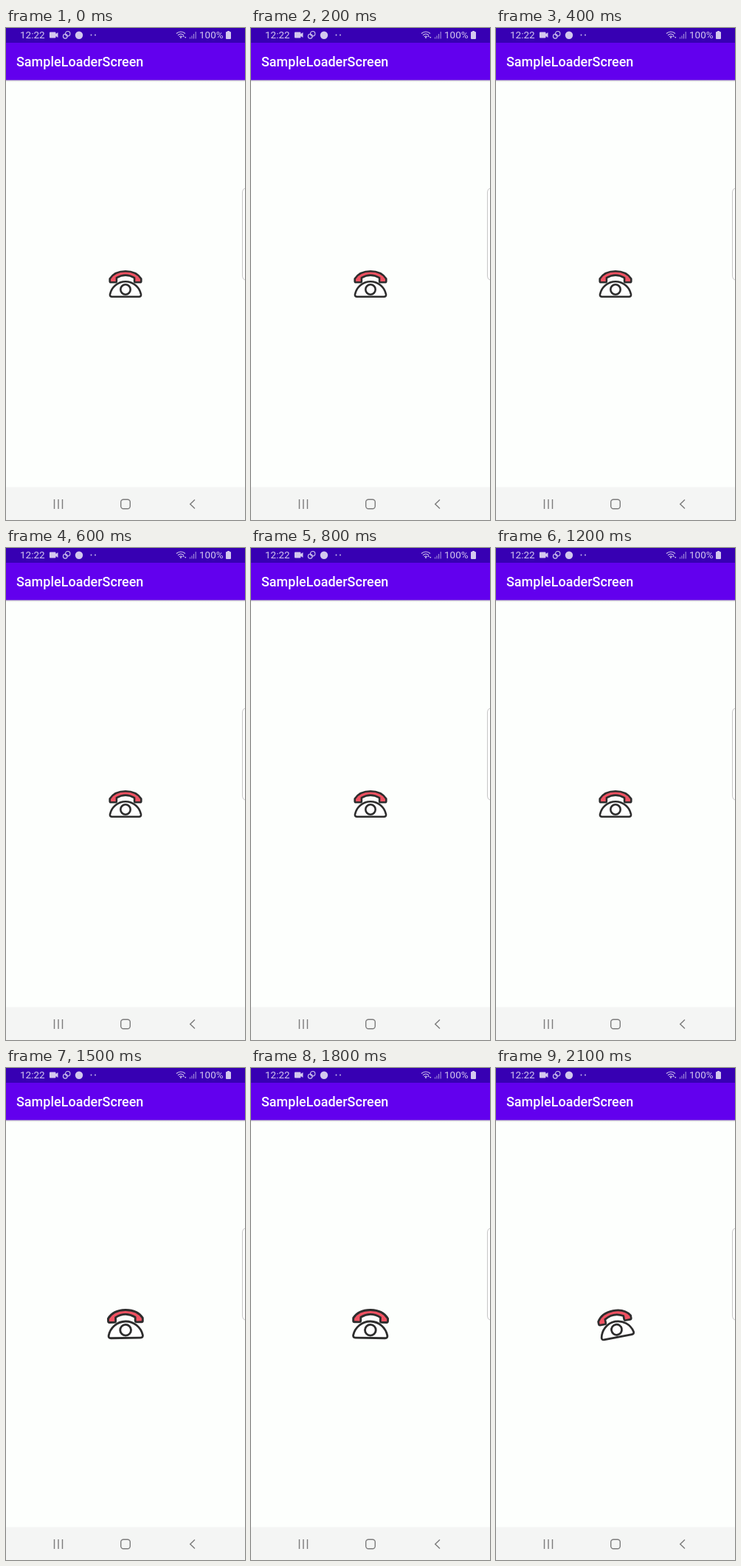
Animation, 324 px wide and 666 px high, one loop 2200 ms. Source, as an HTML page:

```html
<!DOCTYPE html>
<html lang="en">
<head>
<meta charset="utf-8">
<title>Phone loader</title>
<style>
html, body { margin: 0; width: 100%; height: 100%; overflow: hidden; background: #fff; }
svg { display: block; width: 324px; height: 666px; font-family: Roboto, sans-serif; }
.status { fill: #d3c9ee; font-size: 13.5px; }
.thin { fill: none; stroke: #d3c9ee; stroke-width: 1.1; }
.nav { fill: none; stroke: #7b7b7b; stroke-width: 1.4; }
#phone { stroke: #2d2d2d; stroke-width: 2.6; stroke-linejoin: round; }
</style>
</head>
<body>
<svg viewBox="0 0 324 666">
  <defs>
    <linearGradient id="shade" x2="0" y2="1">
      <stop stop-color="#777" stop-opacity=".5"/>
      <stop offset="1" stop-color="#777" stop-opacity="0"/>
    </linearGradient>
  </defs>
  <rect width="324" height="666" fill="#fdfffd"/>
  <rect y="70" width="324" height="3" fill="url(#shade)"/>
  <rect y="20" width="324" height="50.5" fill="#6200ee"/>
  <rect width="324" height="20" fill="#3700b3"/>

  <!-- Status bar -->
  <g class="status">
    <text x="19" y="14">12:22</text>
    <text x="262" y="14">100%</text>
    <path d="M60 5.500h6.500q1 0 1 1v1.500l3-2v7l-3-2v1.500q0 1-1 1H60q-1 0-1-1v-6q0-1 1-1z"/>
    <circle cx="99" cy="9.700" r="5.200"/>
    <circle cx="115.500" cy="9.500" r=".9"/>
    <circle cx="121" cy="9.500" r=".9"/>
    <path d="M300 4h3v1h1q1 0 1 1v8q0 1-1 1h-5q-1 0-1-1V6q0-1 1-1h1z"/>
    <circle cx="237" cy="13" r="1"/>
    <path d="M239.500 12l1.200-2 1.200 2zM242 12h2.400l-1.200 2z"/>
  </g>
  <g class="thin">
    <circle cx="83.700" cy="7.700" r="3.200"/>
    <circle cx="80.300" cy="11.200" r="2.900"/>
    <path d="M231 7.500q6-5 12 0M233 9.800q4-3.500 8 0M235 11.700q2-1.500 4 0"/>
    <path d="M249.500 14.500v-2M252 14.500v-4M254.500 14.500v-6.500M257.200 14.500v-9.500" stroke-opacity=".7"/>
  </g>

  <text x="14" y="52" fill="#fff" font-size="18" font-weight="500">SampleLoaderScreen</text>

  <!-- Edge handle -->
  <path d="M325 217h-1q-3.500 1-3.500 5v114q0 4 3.500 5h1" fill="#fff" stroke="#c6c6c6"/>

  <!-- Navigation bar -->
  <rect y="621.500" width="324" height="45" fill="#f4f5f4"/>
  <g class="nav">
    <path d="M65.500 638v13M71 638v13M76.500 638v13"/>
    <rect x="155.700" y="638.200" width="12.600" height="12.600" rx="3.500"/>
    <path d="M256 638.500l-6.300 6 6.300 6"/>
  </g>

  <g id="phone">
    <path fill="#f05262" d="M140.700 339.500C145 332.500 153 329.200 162 329.200S179 332.500 183.300 339.500v3.200q0 1.600-1.600 1.600h-6q-1.600 0-1.600-1.600v-4.500q-12.100-7.200-24.200 0v4.500q0 1.600-1.600 1.600h-6q-1.600 0-1.600-1.600z"/>
    <path fill="#fff" d="M141 360.500C143 351 151.500 343.300 162 343.300S181 351 183 360.500q.5 3.200-2.700 3.200H143.700q-3.200 0-2.700-3.200z"/>
    <circle cx="162" cy="354" r="6.700" fill="#fff"/>
  </g>
</svg>
<script>
const LOOP = 2200, STEP = 100;
const phone = document.getElementById("phone");

// Each pose: time, scale, tilt in degrees
const poses = [[0, 1, 0], [1200, 1, 0], [1500, 1.1, -1], [1800, 1.1, 1], [2100, 1.05, -11], [2200, 1, 0]];

function draw(now) {
  const t = Math.floor(now % LOOP / STEP) * STEP;
  const i = poses.findIndex(p => p[0] > t);
  const [a, b] = [poses[i - 1], poses[i]];
  const k = (t - a[0]) / (b[0] - a[0]);
  const ease = k * k * (3 - 2 * k);
  const [, scale, tilt] = a.map((v, j) => v + (b[j] - v) * ease);
  phone.setAttribute("transform",
    `translate(162 346.5) rotate(${tilt}) scale(${scale}) translate(-162 -346.5)`);
}

const start = performance.now();
function tick() {
  draw(performance.now() - start);
  requestAnimationFrame(tick);
}
tick();
</script>
</body>
</html>
```
